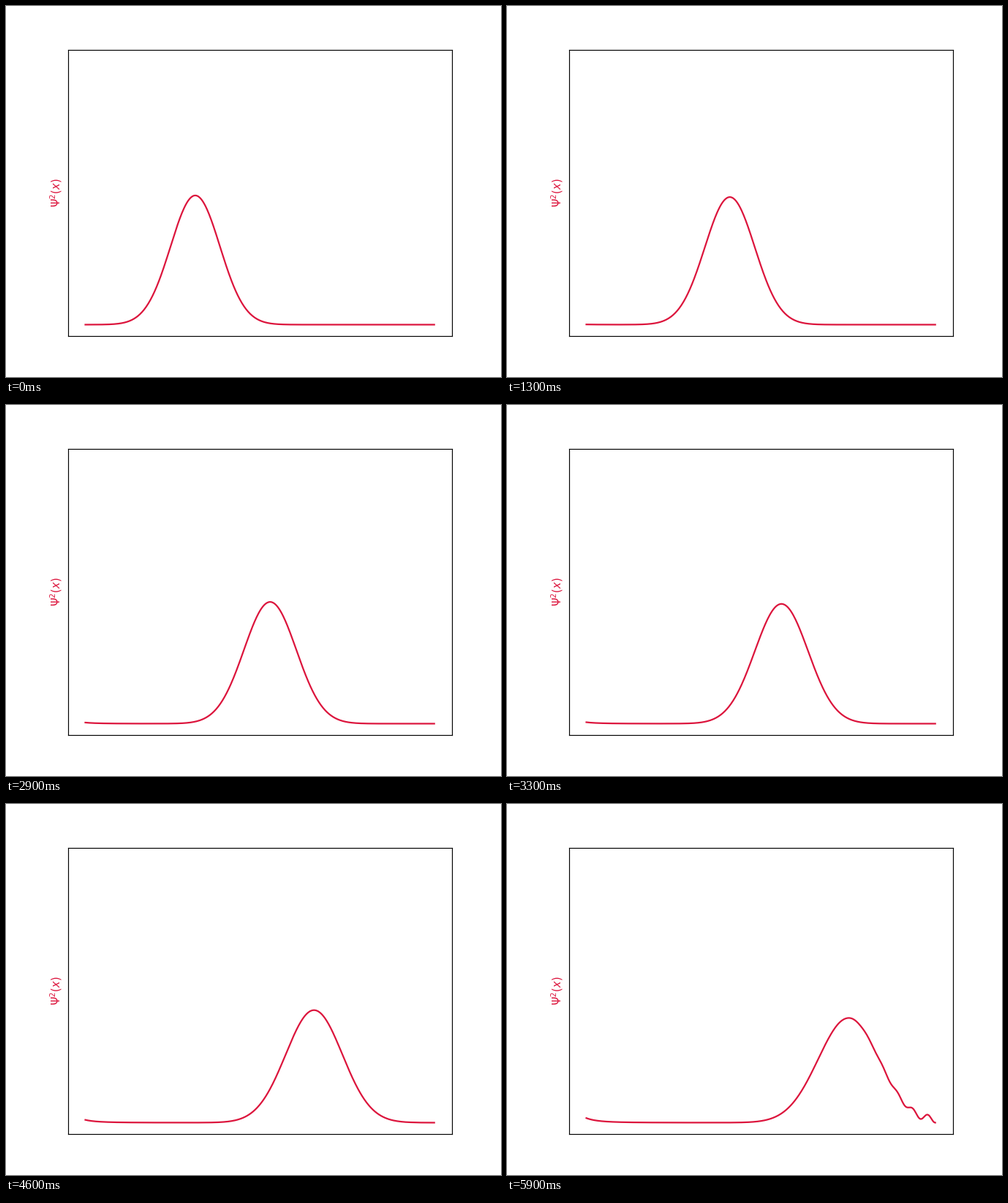
A matplotlib script that plays this animation: 677 px wide and 507 px high, repeating every 6 s.

```python
import numpy as np
import matplotlib.pyplot as plt
from matplotlib.animation import FuncAnimation

WIDE, HIGH = 677, 507
DPI = 105.83
FRAMES, INTERVAL = 60, 100

START, SPEED = 0.315, 0.0740       # packet centre and drift per second
WIDTH = 0.1 / np.sqrt(2)           # initial standard deviation
SPREAD_TIME = 8.157                # seconds until the variance doubles
WAVE_NUMBER = 60.0

x = np.linspace(0, 1, 500)


def packet(pos, t):
    """Complex amplitude of a freely spreading Gaussian packet."""
    u = pos - START - SPEED * t
    ratio = t / SPREAD_TIME
    var = WIDTH**2 * (1 + ratio**2)
    size = (2 * np.pi * var) ** -0.25 * np.exp(-u**2 / (4 * var))
    phase = WAVE_NUMBER * u + ratio * u**2 / (4 * var)
    return size * np.exp(1j * phase)


def density(t):
    # The mirrored packet makes the right edge a hard wall.
    psi = packet(x, t) - packet(2 - x, t)
    left_tail = 0.2 * (t / 5.9) ** 2 / (1 + x / 0.135) ** 4
    return np.abs(psi) ** 2 + left_tail


# The tiny margin keeps the size from rounding down to a pixel less.
fig = plt.figure(figsize=((WIDE + 1e-6) / DPI, (HIGH + 1e-6) / DPI), dpi=DPI)
ax = fig.add_axes([84.66 / WIDE, 55.88 / HIGH, 524.92 / WIDE, 391.15 / HIGH])
ax.set(xlim=(-0.05, 1.05), ylim=(-0.5, 12), xticks=[], yticks=[])
ax.set_ylabel(r"$\Psi^2(x)$", color="crimson", fontsize=10)
line, = ax.plot(x, density(0), color="crimson", lw=1.5)


def update(frame):
    line.set_ydata(density(frame * INTERVAL / 1000))
    return line,


anim = FuncAnimation(fig, update, frames=FRAMES, interval=INTERVAL,
                     repeat=True, repeat_delay=0)
plt.show()
```
